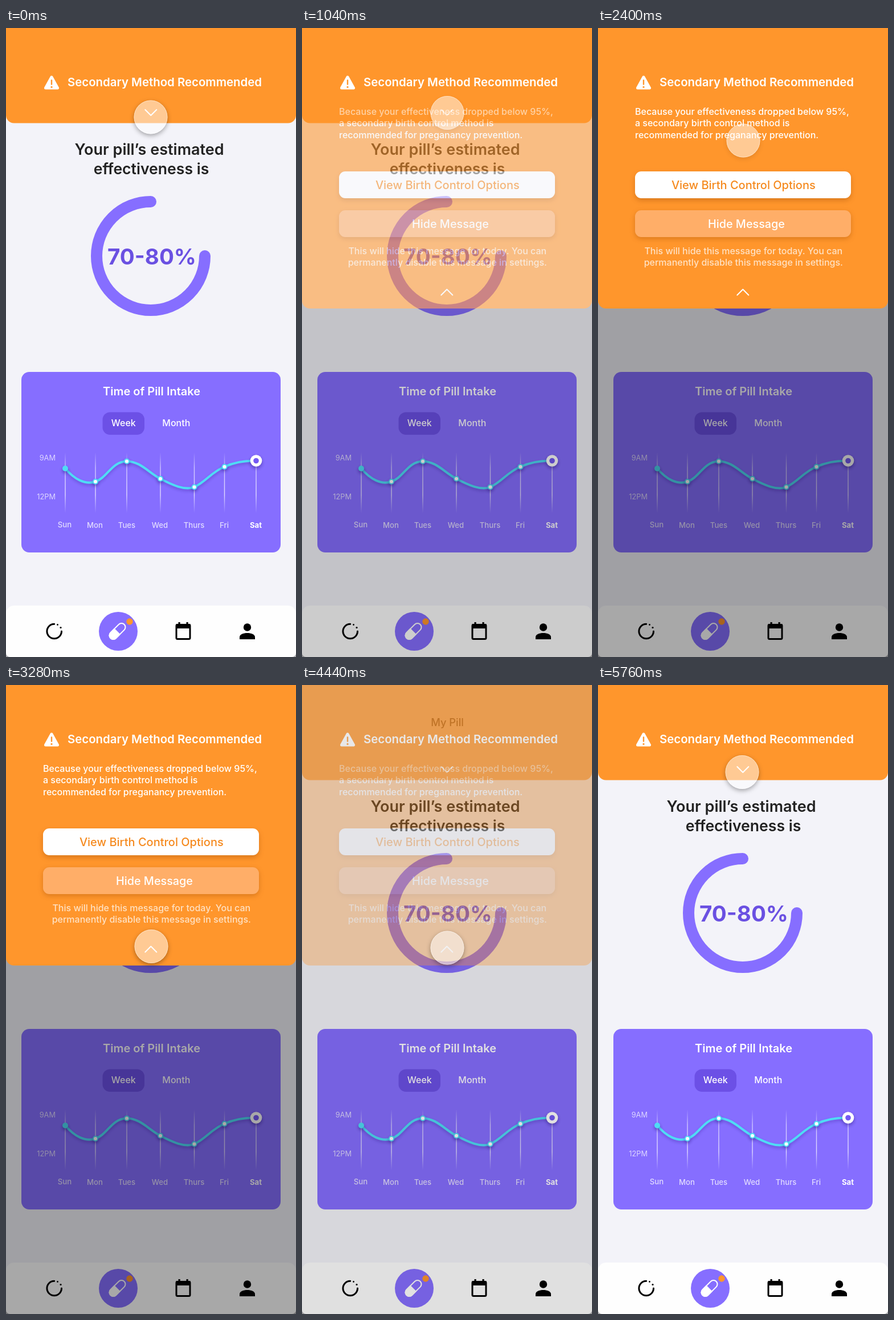
Write an HTML page with a canvas that moves like this. It is 509 px wide and 1101 px high and loops after 5.8 s.

```html
<!DOCTYPE html>
<html lang="en">
<head>
<meta charset="utf-8">
<title>My Pill</title>
<style>
  html, body { margin: 0; width: 100%; height: 100%; overflow: hidden; background: #f3f3f9; }
  canvas { display: block; width: 509px; height: 1101px; }
</style>
</head>
<body>
<canvas id="stage" width="509" height="1101"></canvas>
<script>
const W = 509, H = 1101, LOOP = 5800, TAU = Math.PI * 2;
const ORANGE = '#ff962c', PURPLE = '#866eff', CYAN = '#4fdcf5', PAGE = '#f3f3f9';
const stage = document.getElementById('stage').getContext('2d');

function layer(draw) {
  const canvas = document.createElement('canvas');
  canvas.width = W;
  canvas.height = H;
  draw(canvas.getContext('2d'));
  return canvas;
}

function text(c, str, x, y, size, weight, color, align = 'left') {
  c.font = `${weight} ${size}px Inter, "Open Sans", sans-serif`;
  c.textAlign = align;
  c.fillStyle = color;
  c.fillText(str, x, y);
}

function box(c, x, y, w, h, radius, color) {
  c.beginPath();
  c.roundRect(x, y, w, h, radius);
  c.fillStyle = color;
  c.fill();
}

function dot(c, x, y, r, color) {
  c.beginPath();
  c.arc(x, y, r, 0, TAU);
  c.fillStyle = color;
  c.fill();
}

function line(c, points, width, color) {
  c.beginPath();
  points.forEach(([x, y]) => c.lineTo(x, y));
  c.lineWidth = width;
  c.strokeStyle = color;
  c.stroke();
}

function arc(c, x, y, r, width, color) {
  c.beginPath();
  c.arc(x, y, r, 0, TAU * 0.75);
  c.lineWidth = width;
  c.lineCap = 'round';
  c.strokeStyle = color;
  c.stroke();
}

function withShadow(c, color, blur, dy, draw) {
  c.save();
  c.shadowColor = color;
  c.shadowBlur = blur;
  c.shadowOffsetY = dy;
  draw();
  c.restore();
}

function drawChart(c) {
  const days = [
    ['Sun', 104, 771, 103], ['Mon', 157, 794, 156], ['Tues', 212, 758.5, 212],
    ['Wed', 271, 789, 270], ['Thurs', 330.5, 803.5, 330], ['Fri', 383.5, 768, 383],
    ['Sat', 439, 757.5, 438.5]
  ];
  const fade = c.createLinearGradient(0, 743, 0, 849);
  fade.addColorStop(0, 'rgba(255,255,255,0)');
  fade.addColorStop(0.25, 'rgba(255,255,255,.6)');
  fade.addColorStop(0.7, 'rgba(255,255,255,.75)');
  fade.addColorStop(1, 'rgba(255,255,255,0)');

  days.forEach(([name, x, , labelX], i) => {
    c.fillStyle = fade;
    c.fillRect(x - 0.7, 743, 1.4, 106);
    const last = i === 6;
    text(c, name, labelX, i ? 874.5 : 873.5, 13.2, last ? 700 : 500,
      last ? '#fff' : 'rgba(255,255,255,.76)', 'center');
  });
  text(c, '9AM', 87, 756.5, 12.8, 400, 'rgba(255,255,255,.72)', 'right');
  text(c, '12PM', 87, 824.5, 12.8, 400, 'rgba(255,255,255,.72)', 'right');

  withShadow(c, 'rgba(40,20,130,.3)', 5, 3, () => {
    c.beginPath();
    c.moveTo(104, 771);
    c.bezierCurveTo(120, 790, 139, 800, 157, 794);
    c.bezierCurveTo(178, 787, 186, 758.5, 212, 758.5);
    c.bezierCurveTo(236, 758.5, 250, 778, 271, 789);
    c.bezierCurveTo(292, 800, 314, 810, 330.5, 803.5);
    c.bezierCurveTo(350, 795, 362, 776, 383.5, 768);
    c.bezierCurveTo(401, 760, 420, 757, 439, 757.5);
    c.lineWidth = 4;
    c.strokeStyle = CYAN;
    c.stroke();
  });

  days.forEach(([, x, y], i) => {
    const last = i === 6;
    withShadow(c, 'rgba(40,20,130,.5)', 6, 3,
      () => dot(c, x, y, last ? 10.3 : 5, last ? '#fff' : CYAN));
    if (last) dot(c, x, y, 4.8, '#7459f4');
    else if (i) dot(c, x, y, 3, '#fff');
  });
}

function drawNav(c) {
  c.fillStyle = '#a9a9ac';
  c.fillRect(0, 1085, W, 16);
  box(c, 0, 1011, W, 90, [14, 14, 7, 7], '#fefefe');

  arc(c, 84.7, 1056, 12.8, 3, '#000');
  dot(c, 90.5, 1044.5, 1.4, '#000');
  dot(c, 96, 1049.5, 1.6, '#000');

  dot(c, 197, 1056, 34, PURPLE);
  c.save();
  c.translate(195.5, 1056);
  c.rotate(-Math.PI / 4);
  box(c, -18, -7.8, 18, 15.6, [8, 0, 0, 8], '#fff');
  c.beginPath();
  c.roundRect(-17, -6.8, 34, 13.6, 6.8);
  c.lineWidth = 2;
  c.strokeStyle = '#fff';
  c.stroke();
  c.restore();
  dot(c, 217, 1039, 5.7, ORANGE);

  c.lineWidth = 3;
  c.strokeStyle = '#000';
  c.beginPath();
  c.roundRect(299, 1044.5, 24, 25, 2);
  c.stroke();
  c.fillStyle = '#000';
  c.fillRect(298, 1043.5, 26, 7.5);
  c.fillRect(302.5, 1040, 3.2, 5);
  c.fillRect(316.5, 1040, 3.2, 5);

  dot(c, 423.5, 1049, 6.7, '#000');
  c.beginPath();
  c.moveTo(410, 1070);
  c.lineTo(410, 1066);
  c.bezierCurveTo(410, 1056.5, 437, 1056.5, 437, 1066);
  c.lineTo(437, 1070);
  c.fill();
}

function drawPage(c) {
  c.fillStyle = PAGE;
  c.fillRect(0, 0, W, H);
  text(c, 'My Pill', 255, 71.5, 18.3, 500, '#222', 'center');
  text(c, 'Your pill’s estimated', 251.5, 222, 27, 600, '#222', 'center');
  text(c, 'effectiveness is', 255, 256, 26.6, 600, '#222', 'center');
  arc(c, 254, 399, 95, 20, PURPLE);
  text(c, '70-80%', 256, 413.5, 38.5, 700, '#6a50e2', 'center');

  box(c, 27, 602, 455, 316, 14, PURPLE);
  text(c, 'Time of Pill Intake', 255.5, 642.5, 20, 600, '#fff', 'center');
  box(c, 169.5, 672.5, 73.5, 39.5, 13, '#6c50e6');
  text(c, 'Week', 206.3, 697, 16, 500, '#fff', 'center');
  text(c, 'Month', 298.8, 697, 16, 500, '#fff', 'center');
  drawChart(c);
  drawNav(c);
}

function drawHeading(c, height) {
  box(c, 0, 0, W, height, [0, 0, 14, 14], ORANGE);
  c.lineJoin = 'round';
  c.beginPath();
  c.moveTo(80, 86);
  c.lineTo(90.5, 105);
  c.lineTo(69.5, 105);
  c.closePath();
  c.lineWidth = 5;
  c.strokeStyle = c.fillStyle = '#fff';
  c.stroke();
  c.fill();
  c.lineCap = 'round';
  line(c, [[80, 91.5], [80, 98.5]], 2.4, ORANGE);
  dot(c, 80, 103.3, 1.6, ORANGE);
  text(c, 'Secondary Method Recommended', 108, 101.8, 20.4, 600, '#fff');
}

function chevron(c, y, dip) {
  c.lineCap = c.lineJoin = 'round';
  line(c, [[244.3, y], [254.3, y + dip], [264.3, y]], 2, '#fff');
}

function drawBanner(c) {
  drawHeading(c, 166.5);
  chevron(c, 143, 10);
}

function drawPanel(c) {
  drawHeading(c, 491);
  ['Because your effectiveness dropped below 95%,',
    'a secondary birth control method is',
    'recommended for preganancy prevention.'
  ].forEach((s, i) => text(c, s, 65, 152 + i * 20.4, 16, 500, '#fff'));

  const shade = 'rgba(150,70,0,.35)';
  withShadow(c, shade, 9, 4, () => box(c, 65, 251, 379, 47, 11, '#fff'));
  text(c, 'View Birth Control Options', 255.3, 282, 20, 500, '#f58a1f', 'center');
  withShadow(c, shade, 9, 3, () => box(c, 65, 319, 379, 47, 11, '#ffae68'));
  text(c, 'Hide Message', 260.5, 350, 19.8, 500, '#fff', 'center');

  ['This will hide this message for today. You can',
    'permanently disable this message in settings.'
  ].forEach((s, i) => text(c, s, 255.3, 396 + i * 20.3, 16, 500, 'rgba(255,255,255,.72)', 'center'));
  chevron(c, 467.5, -10);
}

function drawDim(c, amount) {
  c.fillStyle = `rgba(0,0,0,${0.34 * amount})`;
  c.fillRect(0, 0, W, H);
}

const page = layer(drawPage);
const banner = layer(drawBanner);
const panel = layer(drawPanel);
const opened = layer(c => {
  c.drawImage(page, 0, 0);
  drawDim(c, 1);
  c.drawImage(panel, 0, 0);
});

function paint(image, alpha = 1) {
  stage.globalAlpha = alpha;
  stage.drawImage(image, 0, 0);
  stage.globalAlpha = 1;
}

const clamp = v => Math.min(1, Math.max(0, v));
const dissolve = (t, start) => 1 - Math.pow(1 - clamp((t - start) / 300), 1.5);

// time, x, y, shadow strength
const touchKeys = [
  [0, 254, 156, 1], [700, 255, 148.5, 1], [860, 255, 148.5, 0.2],
  [2200, 255, 148.5, 0.2], [3000, 255, 456.5, 1], [3280, 255, 457.5, 1],
  [4200, 255, 460, 1], [4960, 255, 460, 1], [5520, 253, 150, 1],
  [5760, 253, 152.5, 1], [5800, 254, 156, 1]
];

function touchAt(t) {
  const i = touchKeys.findIndex(k => k[0] > t);
  const a = touchKeys[i - 1], b = touchKeys[i];
  const u = (t - a[0]) / (b[0] - a[0]);
  const ease = u * u * (3 - 2 * u);
  return a.map((v, n) => v + (b[n] - v) * ease);
}

function drawTouch(t) {
  const [, x, y, strength] = touchAt(t);
  const r = 29.5;
  stage.save();
  stage.beginPath();
  stage.rect(0, 0, W, H);
  stage.arc(x, y, r, 0, TAU);
  stage.clip('evenodd');
  withShadow(stage, `rgba(0,0,0,${0.36 * strength})`, 8, 3, () => dot(stage, x, y, r - 0.5, '#fff'));
  stage.restore();

  dot(stage, x, y, r, 'rgba(255,255,255,.49)');
  stage.beginPath();
  stage.arc(x, y, r - 0.5, 0, TAU);
  stage.lineWidth = 1;
  stage.strokeStyle = 'rgba(255,255,255,.4)';
  stage.stroke();
}

function render(now) {
  const t = now % LOOP;
  const closing = dissolve(t, 4288);
  paint(page);
  if (closing > 0) {
    paint(banner, closing);
    drawDim(stage, 1 - closing);
    paint(panel, 1 - closing);
  } else {
    paint(banner);
    paint(opened, dissolve(t, 911));
  }
  drawTouch(t);
  requestAnimationFrame(frame);
}

const began = performance.now();
function frame() {
  render(performance.now() - began);
}
frame();
</script>
</body>
</html>
```
